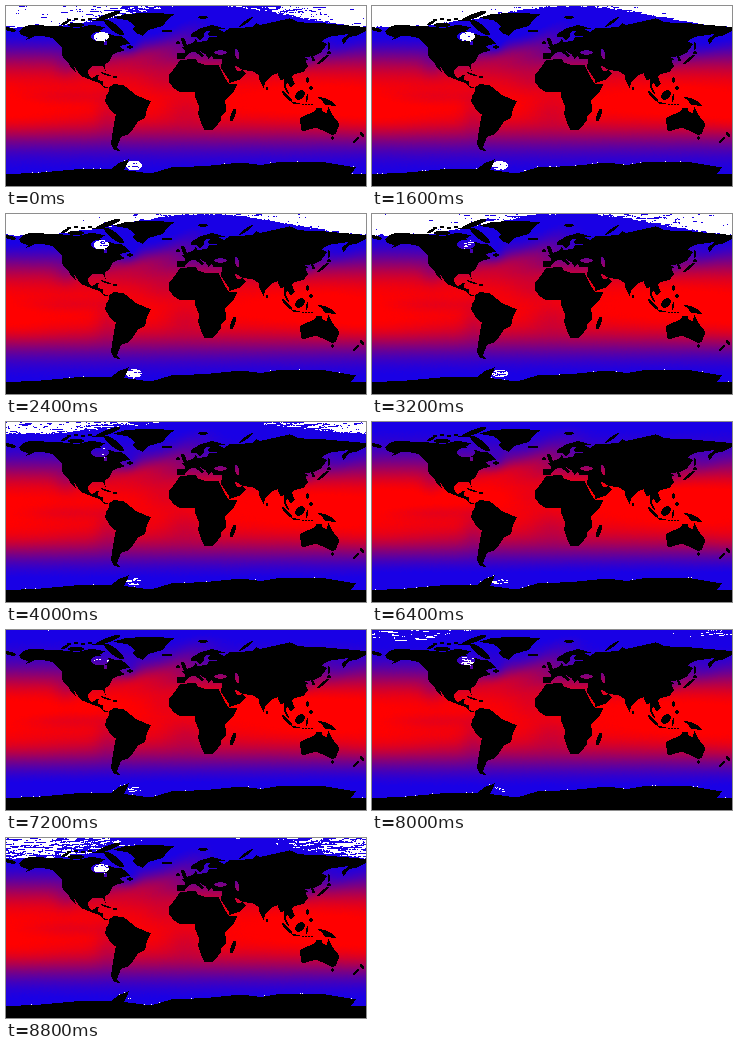
A matplotlib script that plays this animation: 360x180 px, repeating every 9600 ms.

```python
import numpy as np
import matplotlib.pyplot as plt
from matplotlib.animation import FuncAnimation
from matplotlib.path import Path

W, H, MONTHS = 360, 180, 12
LON, LAT = np.meshgrid(np.arange(W) - 179.5, 89.5 - np.arange(H))
ROW = 89.5 - LAT
POINTS = np.column_stack([LON.ravel(), LAT.ravel()])
land = np.zeros((H, W), bool)


def distance(lon, lat, rx, ry, tilt=0):
    """Squared elliptic distance from a place, wrapping round the globe."""
    dx, dy = (LON - lon + 180) % 360 - 180, LAT - lat
    c, s = np.cos(np.radians(tilt)), np.sin(np.radians(tilt))
    return ((dx * c + dy * s) / rx) ** 2 + ((dy * c - dx * s) / ry) ** 2


def coast(*lonlat):
    path = Path(np.reshape(lonlat, (-1, 2)))
    land[path.contains_points(POINTS).reshape(H, W)] = True


def isle(*ellipse):
    land[distance(*ellipse) < 1] = True


def sea(*ellipse):
    land[distance(*ellipse) < 1] = False


def yearly(m, peak):
    return np.cos(2 * np.pi * (m - peak) / MONTHS)


# North America
coast(-167, 65, -163, 69, -156, 71, -128, 70, -108, 68, -94, 71.5, -81, 68.5,
      -87, 65, -78, 62.3, -70, 60, -64.5, 60.3, -56, 52.5, -66, 50, -65, 48,
      -61, 45.8, -70.5, 43, -74, 40.5, -76, 35.3, -81, 31.5, -80.4, 25.2,
      -83, 29.5, -94, 29.5, -97.5, 26, -97.7, 22, -95, 18.3, -91, 18.7,
      -90, 21, -87, 21.3, -88.5, 16, -83.3, 15, -83, 10, -77.5, 8.5,
      -81, 7.5, -87, 13, -95, 16, -105, 20, -113, 31, -109.5, 23, -115, 28,
      -118, 33.5, -122.5, 37.5, -124.5, 42, -124, 48, -134, 58, -146, 60.5,
      -152, 59.5, -162, 55, -158, 58.5, -165, 61.5)
sea(-86, 59.5, 8.7, 5)
sea(-80.5, 53, 1.4, 2.5)
# Greenland
coast(-73, 78.3, -60, 82, -32, 83.5, -12, 81.5, -19, 76, -23, 70, -38, 66,
      -43, 60, -50, 63, -53, 67, -51, 70, -58, 75.5)
# South America
coast(-77.5, 8.5, -72, 12, -62, 10.7, -50, 1, -35.2, -5.5, -39, -13,
      -41, -22, -48, -25.5, -54, -34.5, -58, -38.5, -65, -41, -67, -46,
      -69, -51, -65.5, -55, -72, -54, -75, -48, -73.5, -37, -70.3, -18.5,
      -76, -14, -81, -5, -80, 0, -77.3, 4)
# Africa
coast(-6, 35.8, 10, 37.3, 11, 34, 20, 30.7, 32.5, 31, 37.3, 21, 43, 11.7,
      51.2, 12, 48, 4.5, 39, -5, 40.5, -15, 35, -20, 35.5, -24, 27, -33.7,
      19, -34.5, 15, -27, 12, -17, 13.5, -11, 9, -1, 9.5, 4, -7.5, 4.5,
      -13, 8.5, -17.4, 14.7, -17, 21, -10, 30)
# Europe and the Near East
coast(-9, 37, -9, 43.2, -1.5, 43.5, -1.2, 46, -4.6, 48.4, 8, 54, 10, 57.5,
      11, 54, 21, 55, 23, 59.3, 50, 60, 50, 30, 48, 30, 35, 28, 36, 36.5,
      27.3, 36.8, 26, 40.5, 22.7, 36.7, 19.5, 41.5, 13, 45.5, 18, 40,
      16, 38, 12, 42, 9, 44.3, 3.2, 43, -.3, 39, -2, 36.8)
sea(34.5, 43.5, 6.7, 2.2)
# Scandinavia
coast(50, 59.5, 23, 60, 21.5, 62, 25, 65.5, 21, 65, 17.5, 62, 18.5, 60,
      14, 55.5, 11, 59, 5.5, 58.5, 5, 62, 14, 67.5, 26, 71, 41, 67, 33, 66.5,
      38, 64, 44, 68, 50, 68)
# Siberia
coast(50, 40, 50, 68, 67, 69, 70, 73, 74, 71, 104, 77.7, 113, 73.7, 140, 72.5,
      180, 69, 180, 65, 170, 60, 163, 59, 157, 51, 156, 57, 163, 62,
      143, 59.2, 135.5, 54.7, 141, 52, 135, 43.5, 128, 40)
isle(-176, 66.5, 6, 1.8, -12)
# South and East Asia
coast(49, 42, 130, 42.5, 127.5, 39.5, 129.3, 35.5, 126.5, 34.5, 125, 39.6,
      118, 39, 122.5, 37, 119.5, 35, 122, 30, 118, 24.5, 108, 21.6, 106, 19,
      109, 12, 105, 8.7, 101, 13.4, 99.5, 10, 104, 1.4, 101, 3, 98.5, 8,
      97.5, 16.5, 94.5, 16, 91.5, 22.5, 87, 21.3, 80, 15, 77.5, 8, 73.5, 16,
      72.5, 21, 67, 24.8, 57, 26, 50, 30)
sea(51, 42, 2.2, 5, 15)
# Arabia
coast(35, 28, 42.6, 16.5, 43.5, 12.8, 55, 17, 59.8, 22.5, 56.3, 26, 51, 24.5,
      48, 30.5, 36, 32)
# Australia
coast(114, -22, 115, -34.3, 118, -35, 130, -31.7, 138, -35, 146.5, -39,
      150, -37.5, 153.5, -28, 146.5, -19, 142.5, -10.8, 140.5, -17.5,
      135.5, -15, 136.5, -12, 131, -11.5, 129, -15, 122.5, -18)
# New Guinea
coast(131, -1, 138, -1.7, 147, -6, 150.5, -10.5, 138, -8.3, 137, -5)
# Antarctica
coast(-180, -78, -150, -77, -101, -72.5, -75, -73, -67, -67, -57, -63.3,
      -62, -74, -35, -77.5, -15, -71.5, 20, -70, 55, -66.5, 75, -69,
      90, -66.5, 140, -66.5, 170, -71.5, 165, -78, 180, -78, 180, -91,
      -180, -91)
# Islands: centre, half axes, tilt
isle(-72, 68.5, 12, 3.5, -38)       # Baffin
isle(-110, 71, 8, 2.2)              # Victoria
isle(-121, 73, 4, 1.3, 20)          # Banks
isle(-78, 80, 13, 2.5, 20)          # Ellesmere
isle(-87, 75.5, 7, 1)               # Devon
isle(-56, 49, 3, 1.7)               # Newfoundland
isle(-80, 21.7, 5.5, .9, -18)       # Cuba
isle(-71, 19, 2.8, 1)               # Hispaniola
isle(-2, 53.5, 5, 2, 115)           # Britain
isle(-8, 53.3, 1.8, 1.8)            # Ireland
isle(-18.8, 65, 5, 1.5)             # Iceland
isle(17, 78.7, 5, 1.5)              # Svalbard
isle(60, 74, 8, 1.5, 35)            # Novaya Zemlya
isle(47, -19, 6.8, 2.2, 72)         # Madagascar
isle(81, 7.5, 1, 1.5)               # Sri Lanka
isle(137, 36.5, 7, 1.5, 38)         # Honshu
isle(143, 43.4, 2.2, 1.4)           # Hokkaido
isle(142.8, 50, .9, 4)              # Sakhalin
isle(121.5, 16, 1.2, 3)             # Luzon
isle(125, 7.7, 1.7, 1.9)            # Mindanao
isle(114, 1, 5.5, 3.8, 45)          # Borneo
isle(101, -.3, 7.8, 1.6, -47)       # Sumatra
isle(110, -7.3, 4.7, .8, -6)        # Java
isle(121, -2, 3.8, 1, 80)           # Sulawesi
isle(146.7, -42, 1.7, 1.6)          # Tasmania
isle(176, -38.5, 3.3, 1.4, 115)     # New Zealand
isle(170.3, -43.8, 4.3, 1.2, 45)
for k in range(4):
    isle(-117 + 7 * k, 76 + k % 2, 2.7, .8)
    isle(117 + 3 * k, -8.6, 1.1, .5)

# Bell-shaped temperature profile, bent by the main currents
base = 29.5 * np.exp(-(np.abs(LAT - 1) / 47) ** 3) - 2
swing = np.sin(np.radians(2 * LAT)) * np.where(LAT > 0, 4, 2.3)
CURRENTS = [(-40, 43, 26, 7, 5, 15), (0, 62, 20, 9, 5, 30),
            (-57, 50, 7, 6, -6, 30), (150, 48, 15, 7, -3, 20),
            (122, 37, 5, 5, -6), (-115, -1, 32, 5, -2.5),
            (-78, -18, 9, 14, -4), (-120, 30, 8, 9, -4),
            (-20, 15, 16, 9, -3), (0, -14, 16, 11, -4),
            (130, 0, 45, 16, 2), (-170, -27, 35, 10, 2)]
for lon, lat, rx, ry, warmth, *tilt in CURRENTS:
    base += warmth * np.exp(-distance(lon, lat, rx, ry, *tilt) / 2)

# The pack ice reaches furthest south opposite the North Atlantic
remote = (1 - np.cos(np.radians(LON - 20))) / 2
shore = (LAT < -60) & np.roll(land, -1, axis=0)


def picture(m):
    rng = np.random.default_rng(m + 40)
    heat = base + swing * yearly(m, 7.5) + rng.normal(0, .2, base.shape)
    red = np.clip((heat + 4) / 32, .1, 1)
    image = np.dstack([red, 0 * red, 1 - red])

    # Averaging along each row gives short horizontal floes
    grain = rng.random((H, W))
    floes = sum(np.roll(grain, k, axis=1) for k in range(-3, 4)) / 7
    floes = (floes - .5) / .109
    edge = 21 * remote * np.clip(.8 + yearly(m, 1.5), 0, 1)
    ice = (ROW < edge + .5 * floes) & (
        floes < 3 * yearly(m, 2.2) + 3 * (remote - .7))
    ice |= (distance(-84, 59, 8, 5) < 1) & (floes < 2.5 * yearly(m, 1) - .5)
    ice |= (distance(-52, -69.5, 8, 5 - .25 * m) < 1) & (floes < 1.6 - .25 * m)
    ice |= shore & (grain < .03)
    image[ice] = 1
    image[land] = 0
    return image


fig = plt.figure(figsize=(W / 100, H / 100), dpi=100, facecolor="black")
ax = fig.add_axes([0, 0, 1, 1])
ax.axis("off")
globe = ax.imshow(picture(0), interpolation="nearest", aspect="auto")


def update(m):
    globe.set_data(picture(m))
    return [globe]


anim = FuncAnimation(fig, update, frames=MONTHS, interval=800, repeat=True)
plt.show()
```
